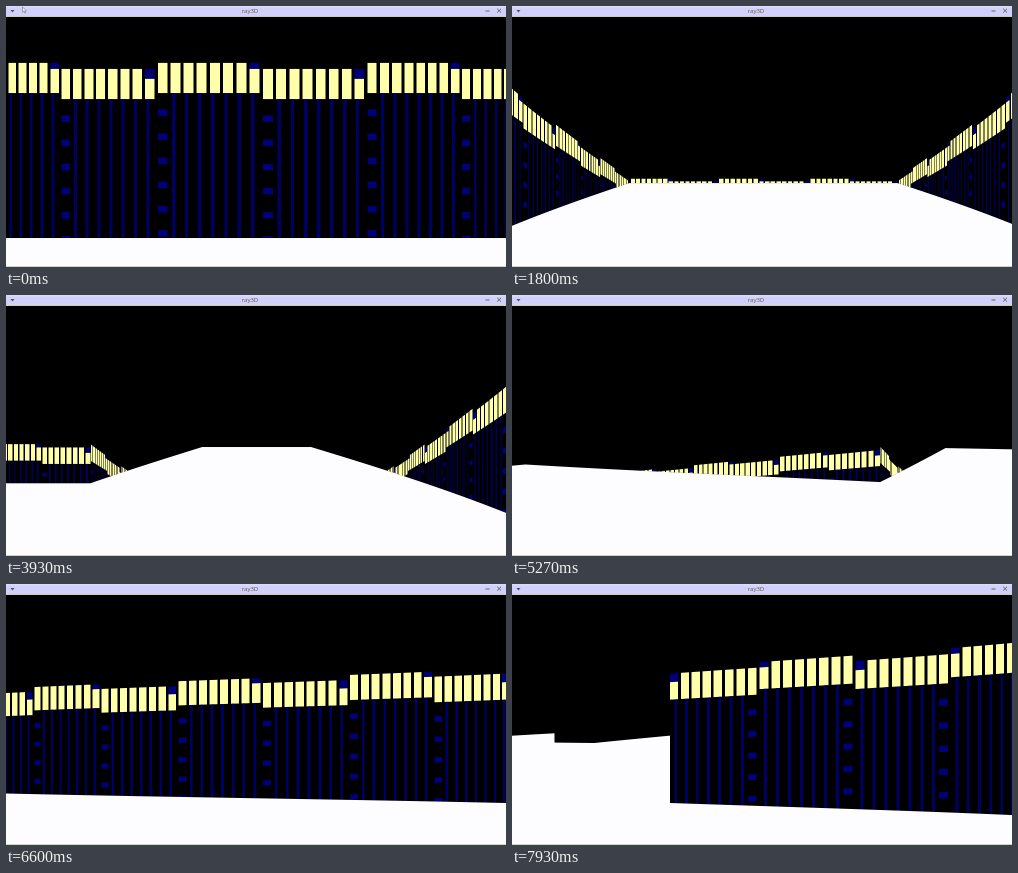
Write an HTML page with a canvas that moves like this. It is 500 px wide and 261 px high and loops after 8000 ms.

```html
<!DOCTYPE html>
<html lang="en">
<head>
<meta charset="utf-8">
<title>ray3D</title>
<style>
  html, body { margin: 0; width: 100%; height: 100%; overflow: hidden; background: #000; }
  #stage { position: relative; width: 500px; height: 261px; overflow: hidden; }
  #view { position: absolute; left: 0; top: 0; width: 500px; height: 261px; }
  #bar {
    position: absolute; left: 0; top: 0; width: 500px; height: 10px;
    background: linear-gradient(#dcdcfb, #d0d0f8 30%, #d0d0f8);
    border-bottom: 1px solid #cfcdb8; box-sizing: content-box;
  }
  #name {
    position: absolute; left: 194px; top: 0; width: 100px; text-align: center;
    font: 6px/10px "Open Sans", "DejaVu Sans", sans-serif; color: #66584e;
  }
  #bar svg { position: absolute; left: 0; top: 0; }
  #pointer { animation: leave 8s linear infinite; }
  @keyframes leave {
    0%, .85% { transform: none; visibility: visible; }
    6.5% { transform: translate(-3px, -9px); visibility: visible; }
    6.6%, 100% { transform: translate(-3px, -9px); visibility: hidden; }
  }
</style>
</head>
<body>
<div id="stage">
  <canvas id="view" width="1000" height="522"></canvas>
  <div id="bar">
    <div id="name">ray3D</div>
    <svg width="500" height="10">
      <path d="M4.5 4h4l-2 2.4z" fill="#50506a"/>
      <path d="M479.5 5h4M491.2 2.8l3.8 3.8M495 2.8l-3.8 3.8" stroke="#6c6660" stroke-width="1" fill="none"/>
      <path id="pointer" d="M16.5 1v5.2l1.3-1.1 1 2 .8-.4-1-1.9h1.7z" fill="#fff" stroke="#55556a" stroke-width=".5"/>
    </svg>
  </div>
</div>
<script>
const LOOP = 8000, STEP = 200 / 3;
const COLS = 1000, FOV = Math.PI / 3;
const TOP = 10.5, MID = 135.5, END = 260.5;
const HALF = 216.5;               // half wall height at distance 1
const YELLOW = '#ffffaa', STRIPE = '#000062', BLUE = '#000078', FLOOR = '#fdfdff';

// Walls along x: [y, from, to]; walls along y: [x, from, to]
const rows = [[0, -1.5, 1.5], [9, -6.5, -1.5], [15, -6.5, -3.5], [21, .5, 1.5]];
const sides = [[-1.5, 0, 9], [1.5, 0, 14], [-6.5, 9, 15], [.5, 21, 60], [5.5, 9, 60]];

// Camera path: time, x, y, heading (radians, left of north)
const path = [
  [0, -.017, 2.243, 0],
  [1000, -.017, 2.243, 0],
  [3933, -.017, 13.1, 0],
  [4400, -.017, 14.83, 0],
  [4570, .01, 15.25, .06],
  [4930, -.22, 14.3, .25],
  [5267, -.63, 13.24, .45],
  [5700, -1.5, 12.03, .66],
  [6133, -2.5, 10.95, .9],
  [6370, -3.15, 10.5, 1.28],
  [6600, -3.766, 10.239, 1.675],
  [7000, -4, 10.75, 2.2],
  [7500, -4.3, 11.8, 2.8],
  [7933, -4.457, 12.538, 3.32],
  [LOOP, -4.457, 12.538, 3.32]
];

const g = document.getElementById('view').getContext('2d');
const frac = v => v - Math.floor(v);

function pose(t) {
  let i = 1;
  while (i < path.length - 1 && t > path[i][0]) i++;
  const a = path[i - 1], b = path[i];
  const k = (t - a[0]) / (b[0] - a[0]);
  return [1, 2, 3].map(j => a[j] + (b[j] - a[j]) * k);
}

// Nearest wall along a ray: distance and texture column 0..64
function cast(x, y, dx, dy) {
  let near = 1e9, u = 0;
  for (const [wy, a, b] of rows) {
    const d = (wy - y) / dy, hx = x + d * dx;
    if (d > 0 && d < near && hx >= a && hx <= b) { near = d; u = frac(hx + .5); }
  }
  for (const [wx, a, b] of sides) {
    const d = (wx - x) / dx, hy = y + d * dy;
    if (d > 0 && d < near && hy >= a && hy <= b) { near = d; u = frac(-hy); }
  }
  return [near, u * 64];
}

function column(i, h, u) {
  const foot = Math.min(END, MID + h), head = Math.max(TOP, MID - h);
  const at = k => END - h * k / 32;
  const band = (k1, k2, color) => {
    const y1 = Math.max(head, at(k1)), y2 = Math.min(foot, at(k2));
    if (y2 <= y1) return;
    g.fillStyle = color;
    g.fillRect(i, y1 * 2, 1, (y2 - y1) * 2);
  };
  const brick = Math.floor(u / 4), tex = u % 4;
  const low = brick > 7, shift = low ? 2 : 0;
  const crown = 67.5 - shift, base = 57.5 - shift;
  if (tex >= 1) {
    const notch = brick % 8 === 7 ? (low ? 3.3 : 2) : 0;
    if (notch) band(crown, crown - notch, BLUE);
    band(crown - notch, base, YELLOW);
    if (brick % 8 === 0) {
      for (let k = 52.1 - shift; k > -32; k -= 8) band(k, k - 2.2, BLUE);
    } else if (tex >= 1.4 && tex < 2.4) {
      band(base, -64, STRIPE);
    }
  }
  g.fillStyle = FLOOR;
  g.fillRect(i, foot * 2, 1, (END - foot) * 2);
}

function draw(t) {
  const [x, y, turn] = pose(t);
  g.fillStyle = '#000';
  g.fillRect(0, 0, COLS, 522);
  for (let i = 0; i < COLS; i++) {
    const off = ((i + .5) / COLS - .5) * FOV, dir = turn - off;
    const [d, u] = cast(x, y, -Math.sin(dir), -Math.cos(dir));
    column(i, HALF / (d * Math.cos(off)), u);
  }
  g.fillStyle = '#d2d2c0';
  g.fillRect(0, 520, COLS, 2);
}

let shown = -1;
function tick() {
  const n = Math.floor((performance.now() % LOOP + 5) / STEP) % 120;
  if (n !== shown) draw((shown = n) * STEP);
  requestAnimationFrame(tick);
}
tick();
</script>
</body>
</html>
```
